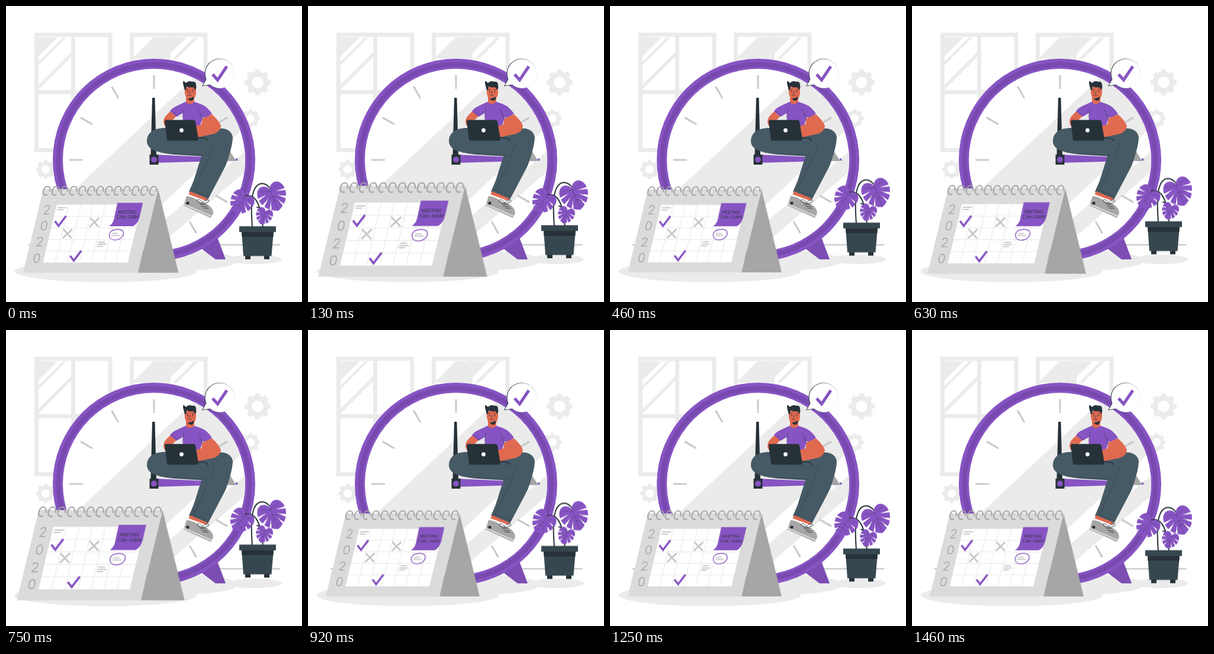
Animation of 500 by 500 pixels, one loop 1500 ms. Source, as an HTML page:

```html
<!DOCTYPE html>
<html lang="en">
<head>
<meta charset="utf-8">
<title>Meeting planner</title>
<style>
html, body { margin: 0; width: 100%; height: 100%; overflow: hidden; background: #fff; }
svg { display: block; width: 100vw; height: 100vh; }
.purple { fill: #8754c3; }
.dark { fill: #263238; }
.skin { fill: #e06a50; }
.pants { fill: #465a65; }
.pale { fill: #ebebeb; }
.line { fill: none; stroke: #263238; stroke-width: .8; stroke-linecap: round; }
.tick { fill: none; stroke: #8754c3; }
.gear { fill: none; stroke: #ebebeb; }
.year { font: italic 300 21px Inter, Lato, sans-serif; fill: #a0a0a0; text-anchor: middle; }
.note { font: italic 400 7px Lato, Inter, sans-serif; letter-spacing: .25px; fill: #263238; }
#calendar { transform-origin: 160.5px 376px; animation: beat 1.5s linear -15ms infinite; }
#plant { animation: float 1.5s linear -15ms infinite; }
@keyframes beat {
  0%, 30%, 40%, 60%, 100% { transform: scale(1); }
  10%, 50% { transform: scale(1.1); }
}
@keyframes float {
  0%, 100% { transform: translateY(0); }
  50% { transform: translateY(-10px); }
}
</style>
</head>
<body>
<svg viewBox="0 0 500 500">
  <defs>
    <clipPath id="face"><circle cx="250" cy="260" r="154"/></clipPath>
    <path id="frame" d="M51.5 48.5H176V243.5H51.5ZM113.5 48V244M51 145.5H176" fill="none" stroke="#ebebeb" stroke-width="7"/>
    <g id="gear" class="gear">
      <circle r="14" stroke-width="8.5"/>
      <circle r="19.5" stroke-width="5" pathLength="80" stroke-dasharray="5.2 4.8" stroke-dashoffset="2.6"/>
    </g>
    <g id="leaf">
      <path class="purple" d="M0-13C5-25 19-26 24-14Q26-10 26-5L9-6 26-1Q25 5 23 9L8 1 21 13Q18 18 14 21L6 8 11 23Q6 27 0 29Q-6 27-11 23L-6 8-14 21Q-18 18-21 13L-8 1-23 9Q-25 5-26-1L-9-6-26-5Q-26-10-24-14C-19-26-5-25 0-13Z"/>
      <path class="line" opacity=".4" d="M0-13V26M0-9L17-15M0-9L-17-15M0 2L17 5M0 2L-17 5M0 9L12 16M0 9L-12 16"/>
    </g>
    <path id="ring" d="M6 2C8-7-1-9-4-1C-7 5-4 10 1 8" fill="none" stroke="#a3a3a3" stroke-width="2" stroke-linecap="round"/>
    <path id="cross" d="M-8 8L8-7M-7-7L7 8" stroke="#c7c7c7" stroke-width="2.8"/>
    <path id="done" class="tick" d="M-9-1L-3 7 9.500-9.500" stroke-width="3.400"/>
  </defs>

  <path class="pale" d="M54 53H87L54 86ZM96 53H102L54 101V95ZM110 78V86L55 141H47Z"/>
  <path class="pale" d="M249 53H305L269 89H213Z"/>
  <path class="pale" d="M318 53H325L289 89H282Z"/>
  <use href="#frame"/>
  <use href="#frame" x="161"/>
  <use href="#gear" transform="translate(425 129)"/>
  <use href="#gear" transform="translate(413 190) scale(.71)"/>
  <use href="#gear" transform="translate(67 276) scale(.73)"/>

  <path class="line" d="M38 403.5H463" style="stroke-width:.5"/>
  <ellipse class="pale" cx="290" cy="430" rx="102" ry="17"/>
  <ellipse class="pale" cx="168.5" cy="448" rx="154" ry="18.5"/>
  <ellipse class="pale" cx="420" cy="428" rx="46" ry="8"/>

  <g id="clock">
    <path fill="#7c4db3" d="M356 388L371 428H354L329 409Z"/>
    <circle class="purple" cx="250" cy="260" r="171"/>
    <circle cx="250" cy="260" r="161.5" fill="none" stroke="#784aaf" stroke-width="8"/>
    <circle cx="250" cy="260" r="154" fill="#fff"/>
    <g clip-path="url(#face)" class="pale">
      <path d="M320 119L108 317 100 487 430 180V119ZM410 240L230 394 255 408 420 266Z"/>
    </g>
    <circle cx="250" cy="260" r="131.5" fill="none" stroke="#c9c9c9" stroke-width="23" pathLength="826.2" stroke-dasharray="3 65.85" stroke-dashoffset="1.5"/>
    <path class="purple" d="M250 251L391 257.5V261L250 265Z"/>
    <path class="dark" d="M247 155H251.5L254 251H257.5V268H242.5V251H244.5Z"/>
    <circle class="purple" cx="250" cy="259.5" r="5"/>
  </g>

  <g id="man">
    <path fill="#a6a6a6" d="M374 238L388 259Q386 263 380 262L364 258Z"/>
    <path d="M376 240L388 259" fill="none" stroke="#fff" stroke-width="1.5"/>
    <path class="skin" d="M279 177Q266 187 266 195Q266 203 274 208L294 200 280 194 290 184Z"/>
    <path class="pants" d="M272 206C250 205 238 214 238 228C238 242 254 248 285 251L350 255 372 216 334 212Z"/>
    <path class="purple" d="M303 162L290 168Q279 173 277 178L288 187 299 181 298 206 326 207 333 187 337 190 348 182Q340 170 330 166L319 162Z"/>
    <path class="line" d="M301 173L298 188M324 174Q328 184 336 190M327 182L333 195M281 178L290 186" opacity=".55"/>
    <path class="skin" d="M304 153L304 162Q309 169 318 162L318 151Z"/>
    <path class="skin" d="M302 137Q301 148 304 154Q308 160 315 158Q321 155 321 146V136Z"/>
    <path class="dark" d="M302 142L300 135Q298 128 300 126.500L304 130Q309 125 314 128Q321 127 321 133Q322 139 319 142L317 137.500Q309 138 305 136L304 142Z"/>
    <path class="dark" d="M307 156Q312 157 317 153Q318 159 313 160Q309 160 307 156Z"/>
    <path class="line" d="M305 141.500L308 141M314 141L317 141.500M311 144L310 148.500M307 150Q310 153 313 151"/>
    <circle class="dark" cx="307" cy="144.5" r=".9"/>
    <circle class="dark" cx="315.5" cy="144.5" r=".9"/>
    <path class="pants" d="M336 211Q352 206 368 207Q381 210 383 221Q383 237 371 270L341 327 309 314 317 295 330 254 340 234Z"/>
    <path class="line" d="M352 229Q347 247 335 272L318 309M311 309L342 322M282 249Q312 252 336 252" opacity=".55"/>
    <path class="skin" d="M332 190L348 183Q361 195 363 203Q362 212 351 216L323 222 320 203 330 200Z"/>
    <path d="M324 222L338 224 341 228" fill="none" stroke="#263238" stroke-width="1.500"/>
    <path class="dark" d="M270 192.500H317Q319 192.500 320 195L325 225Q325 227.500 322 227.500H275Q273 227.500 272 226L268 195Q268 192.500 270 192.500Z"/>
    <circle cx="296.5" cy="210" r="3.4" fill="#fff"/>
    <path class="skin" d="M311 313L340 325 338 330 308 319Z"/>
    <path fill="#fff" d="M308 318L338 329 334 334 306 323Z"/>
    <path fill="#a6a6a6" d="M305 321Q317 322 326 330L340 335Q350 341 350 350L346 358 300 337Z"/>
    <path d="M301 335L347 355" fill="none" stroke="#d9d9d9" stroke-width="2"/>
    <path class="line" d="M330 334Q319 329 324 327Q330 327 332 333Q335 326 342 328Q346 331 332 334M328 335L338 335M330 338L340 339M333 341L342 342"/>
    <circle class="dark" cx="307" cy="333" r="2.6"/>
  </g>

  <g id="bubble">
    <path class="dark" d="M338 123L331 135.500 347 133Z"/>
    <circle class="dark" cx="360.7" cy="114" r="25"/>
    <path d="M339 123L332.500 134.500 349 132Z" fill="#fff"/>
    <circle cx="361.300" cy="114.300" r="24.7" fill="#fff"/>
    <path class="tick" d="M349 115.500L357.500 125 373 102" stroke-width="5"/>
  </g>

  <g id="plant">
    <path class="line" style="stroke-width:2" d="M416 374C414 345 411 302 432 300Q440 300 447 309M434 374C431 340 424 317 404 321M424 340Q428 340 431 346"/>
    <use href="#leaf" transform="translate(450 321) rotate(-22) scale(.93)"/>
    <use href="#leaf" transform="translate(398 331) rotate(35) scale(.77)"/>
    <use href="#leaf" transform="translate(436 354) rotate(20) scale(.55)"/>
    <path class="dark" d="M404 420H413V428H404ZM436 420H445V428H436Z"/>
    <path fill="#37474f" d="M398 380H452L448.500 422.500H401Z"/>
    <path class="dark" d="M398 381H452L451.500 390H398.500Z"/>
    <path fill="#37474f" d="M394 372.200H456V382H394Z"/>
  </g>

  <g id="calendar">
    <path fill="#a6a6a6" d="M256 310L290 450H222Z"/>
    <path fill="#dbdbdb" d="M64 310H256L222 450H30Z"/>
    <path fill="#fff" d="M86.5 336H228.5L205 433H63.5Z"/>
    <g id="grid" stroke="#e8e8e8"></g>
    <g class="year">
      <text x="70" y="352">2</text><text x="65" y="379">0</text>
      <text x="58" y="406">2</text><text x="53" y="433">0</text>
    </g>
    <path d="M88 341H103M87 344.5H98M179 384H189M178 387.5H192M156 398.5H167M154.5 402H169M153.5 405.5H164" stroke="#c7c7c7" stroke-width="1.8"/>
    <path class="purple" d="M188 333H230.5L225 357Q222 368 214 372H174Q182 367 183 356Z"/>
    <text class="note" x="189" y="351">MEETING</text>
    <text class="note" x="185.5" y="359.5">13th-10AM</text>
    <use href="#cross" x="149.5" y="365"/>
    <use href="#cross" x="104.5" y="384"/>
    <use href="#done" x="92.5" y="364.5"/>
    <use href="#done" x="118" y="422.500"/>
    <path class="tick" d="M183 378C172 380 171 393 182 395C193 396 201 387 197 380Q191 375 180 379" stroke-width="1.3"/>
    <g id="rings"></g>
  </g>
</svg>
<script>
const fill = (id, count, make) =>
  document.getElementById(id).innerHTML = Array.from({ length: count }, (_, i) => make(i)).join("");

fill("rings", 13, i => `<use href="#ring" x="${69 + i * 14.85}" y="311.5"/>`);
fill("grid", 10, i => {
  if (i < 6) {
    const x = 86.5 + (i + 1) * 20.3;
    return `<path d="M${x} 336l-23 97"/>`;
  }
  const y = 336 + (i - 5) * 19.4;
  return `<path d="M${86.5 - (y - 336) * 0.237} ${y}h142"/>`;
});
</script>
</body>
</html>
```
